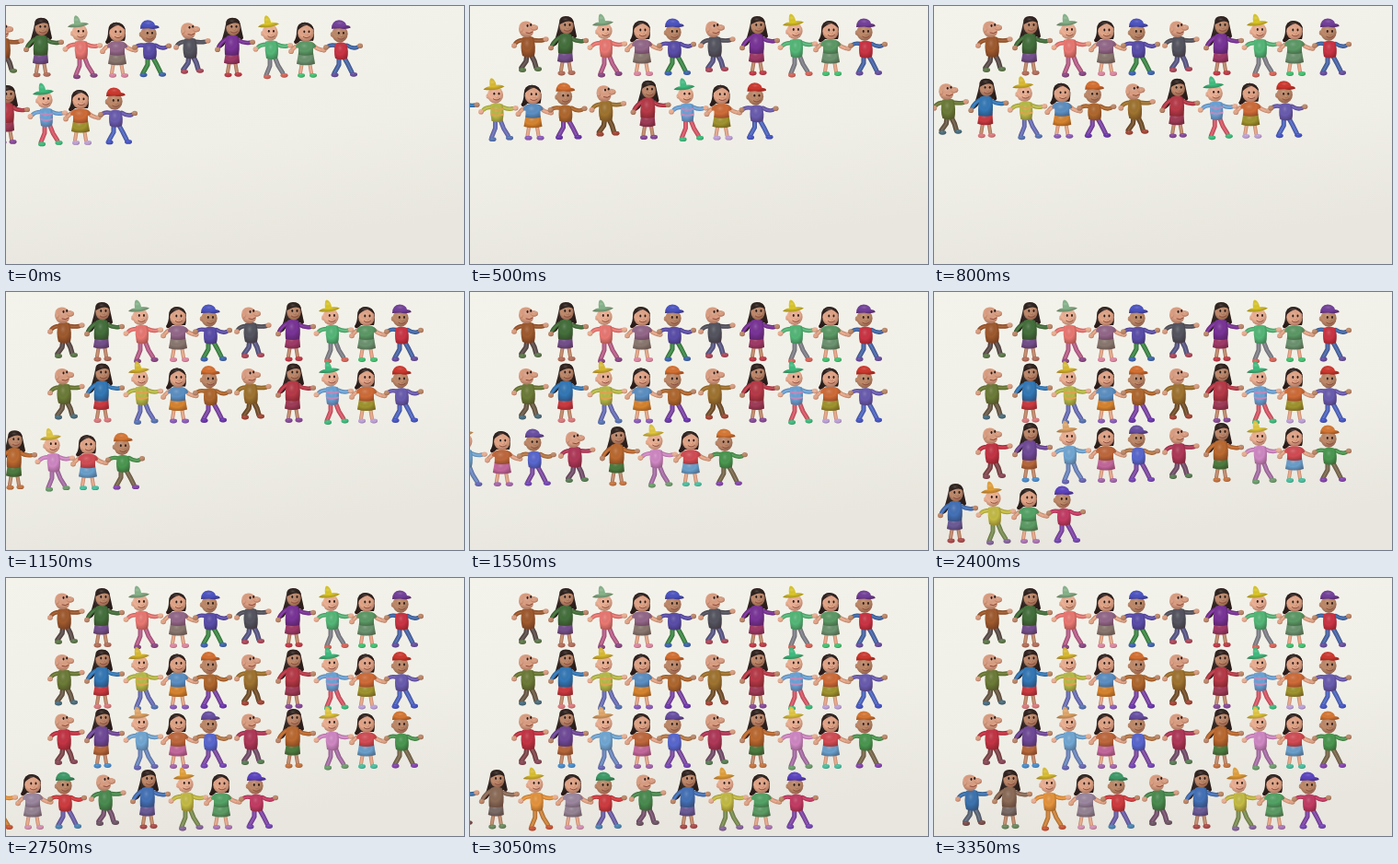
Write an HTML page that moves like this. It is 498 by 280 pixels and loops after 3.4 s.

```html
<!DOCTYPE html>
<html lang="en">
<head>
<meta charset="utf-8">
<title>Clay parade</title>
<style>
  html, body { margin: 0; width: 100%; height: 100%; overflow: hidden; background: #f1f0e8; }
  svg { display: block; position: absolute; left: 0; top: 0; }
</style>
</head>
<body>
<svg width="498" height="280" viewBox="0 0 498 280">
  <defs>
    <linearGradient id="paper" x1="0" y1="0" x2=".25" y2="1">
      <stop offset="0" stop-color="#f4f3eb"/>
      <stop offset=".6" stop-color="#f0efe7"/>
      <stop offset="1" stop-color="#e8e6de"/>
    </linearGradient>
    <radialGradient id="clay" cx=".42" cy=".34" r=".72">
      <stop offset="0" stop-color="#fff" stop-opacity=".18"/>
      <stop offset=".5" stop-color="#000" stop-opacity="0"/>
      <stop offset="1" stop-color="#200" stop-opacity=".32"/>
    </radialGradient>
  </defs>
  <rect width="498" height="280" fill="url(#paper)"/>
  <g id="stage"></g>
</svg>
<script>
const LOOP = 3400, STEP = 50;
const HAIR = '#30231f';
const SKIN = { man: '#dda083', long: '#c08a6c', hat: '#eeb295', girl: '#e4a688', cap: '#bf8a6a' };
const KINDS = ['man', 'long', 'hat', 'girl', 'cap'];
const XS = [64, 103, 147, 187, 222, 267, 311, 354, 392, 430];

// Per figure: shirt, trousers or skirt, shoes, headwear, accent (stripes or sleeves)
const ROWS = [
  { y: 0, tilt: .027, path: [[0, -66], [250, -22], [480, 0]], wear: [
    '#a05a2e #5c4f4c #5f7a4c', '#44703c #74508c #b8705c', '#ea7872 #b8608a #8c4a86 #86b48a',
    '#94688a #8a7870 #e08aa4', '#5a4eaa #3f8a48 #3f68b4 #4c54c4', '#555560 #5a5a88 #b04a5c',
    '#7a3498 #a03a68 #c43c48', '#54b878 #80828a #d8685c #dcc828', '#5c9a66 #6c9470 #48c474',
    '#cc3444 #4a68a8 #6a50a4 #74409c #4068a8'] },
  { y: 66.5, tilt: .027, path: [[0, -311], [500, -118.5], [750, -57], [990, -20], [1150, 0]], wear: [
    '#6c7c38 #6b5b48 #4c7080', '#3479b8 #cc3a40 #e07c80', '#b8bc48 #6a70b8 #5a78b8 #dcbc30 #e0a050',
    '#5c90c4 #d8842e #9060c0', '#b0682e #7c46a6 #6c38b0 #d87030', '#a07430 #74522e #a84838',
    '#b83a48 #a03c58 #8a4c9c', '#6ca4d8 #d85868 #40c080 #40be80 #c088b8', '#d06c38 #a0942e #c2a4dc',
    '#6a5cb0 #5068c0 #4858c8 #d0382e'] },
  { y: 131, tilt: .027, path: [[790, -460], [1150, -303], [1540, -156], [1650, -115], [1900, -57], [2150, -20], [2350, 0]], wear: [
    '#c43444 #80484c #8a4a58', '#704a98 #b8683a #4c90d0', '#72a8d4 #6c88c0 #6a68b8 #e2a768',
    '#c0683c #c4689c #a868b0', '#5868d0 #7e4ca4 #7848b8 #6a50a4 #b87844', '#b03858 #74506c #5c8058',
    '#bc6a30 #4c7c40 #c87844', '#d088c4 #a870a8 #70a070 #e2c840', '#d44c54 #6aa0cc #48c4a4',
    '#4a9850 #7a6a50 #8848b0 #d87834'] },
  { y: 197, tilt: 0, path: [[1980, -460], [2400, -289], [2750, -158], [3000, -86], [3350, -22]], wear: [
    '#3c74b0 #5c6878 #7c504c', '#8c6c58 #7c6c68 #6c8c60', '#e6943c #cc843c #cc5838 #dcc030',
    '#9c88a0 #968494 #d894b4', '#d03c40 #6c60a8 #4c88b8 #3c9c68', '#4a8c50 #785470 #705868',
    '#4472b8 #6c5c98 #b04c4c', '#c4bc44 #7c9054 #8868a0 #e4a038', '#54a466 #5c9c64 #b078b8',
    '#c43c64 #8048a8 #7848b8 #5c44c4'] }
];

const clay = (tag, fill) => `<${tag} fill="${fill}"/><${tag} fill="url(#clay)"/>`;
const blob = (d, fill) => clay(`path d="${d}"`, fill);
const ball = (x, y, rx, ry, fill) => clay(`ellipse cx="${x}" cy="${y}" rx="${rx}" ry="${ry}"`, fill);
const line = (d, color, w, extra = '') =>
  `<path d="${d}" fill="none" stroke="${color}" stroke-width="${w}" stroke-linecap="round" stroke-linejoin="round" ${extra}/>`;
const limb = (d, color, w) => line(d, color, w) +
  line(d, '#200', w, 'opacity=".17"') + line(d, color, w * .62) + line(d, '#fff', w * .2, 'opacity=".14"');
const eye = (x, y) => `<ellipse cx="${x}" cy="${y}" rx="1" ry="1.4" fill="#2a1c18"/>`;

function face(x, y, skin) {
  return eye(x - 2.2, y - 2) + eye(x + 3, y - 2) + ball(x + .7, y + .8, 1.8, 1.6, skin) +
    line(`M${x - 3.2} ${y + 3.6}q3.6 2.8 7.2-.2`, '#8a4638', .9);
}

const arms = (left, right, color, skin, lh, rh) =>
  limb(left, color, 4.4) + limb(right, color, 4.4) + ball(...lh, 2.9, 2.8, skin) + ball(...rh, 3, 2.7, skin);
const shoes = (a, b, color) => ball(a[0], a[1], 4, 2.4, color) + ball(b[0], b[1], 4, 2.4, color);

const draw = {
  man(skin, shirt, low, shoe) {
    return limb('M-2 52L-3 60L-8 67', low, 5.4) + limb('M2 52L6 60L8 67', low, 5.4) +
      shoes([-7, 69.5], [10, 68.5], shoe) +
      arms('M-6 37Q-12 37-15 41', 'M5 37Q11 38 16 37', shirt, skin, [-16, 43], [18.5, 36]) +
      blob('M-7 34Q-1 31 5 34Q8 44 6 54Q-1 57-7 54Q-10 44-7 34Z', shirt) +
      blob('M-11 25Q-11 17-4 16.5Q1 16 4 20Q9 20 9 23.5Q9 26.5 5 27Q5 33-2 34Q-10 34-11 25Z', skin) +
      ball(-8.5, 26, 2, 2.6, skin) + ball(6, 23.5, 4, 3, skin) +
      eye(-1.5, 21.5) + eye(2.2, 20.5) + line('M-3 29q4 1.8 7-.8', '#8a4638', 1);
  },
  long(skin, shirt, low, shoe) {
    return blob('M-6 18Q-6 11 1 11Q9 11 10 19L13 33Q11 37 9 33L-4 34Q-8 44-14 44Q-9 34-6 18Z', HAIR) +
      limb('M-2 58L-4 70', skin, 4) + limb('M4 58L6 70', skin, 4) + shoes([-3.5, 73], [7.5, 72.5], shoe) +
      arms('M-5 34Q-11 37-14 43', 'M7 35Q13 39 20 38', shirt, skin, [-15, 45.5], [23, 37.5]) +
      blob('M-6 47L8 47L9 60Q1 63-8 60Z', low) +
      blob('M-5 31Q1 28.5 7 31Q10 40 8 51Q1 53-7 51Q-8 40-5 31Z', shirt) +
      ball(2, 22, 7.6, 8.4, skin) + blob('M-5.5 20Q-4 11 3 11.5Q9 12 9.5 18Q4 14-5.5 20Z', HAIR) + face(2.5, 22.5, skin);
  },
  hat(skin, shirt, low, shoe, hat, stripe) {
    const bands = stripe ? [42, 48].map(y => line(`M-5 ${y}Q1 ${y + 2} 7 ${y}`, stripe, 2)).join('') : '';
    return limb('M-1 53L-1 63L-5 73', low, 4.8) + limb('M4 53L8 63L13 71', low, 4.8) +
      shoes([-4, 75], [14.5, 73.5], shoe) +
      arms('M-5 40Q-11 40-14 43', 'M7 40Q13 43 18 41.5', shirt, skin, [-16.5, 45], [21, 41]) +
      blob('M-6 37Q1 34 7 37Q9 46 7 55Q1 57.5-5 55Q-7 46-6 37Z', shirt) + bands +
      ball(-9, 28, 2, 2.7, skin) + ball(-1, 27, 8.6, 9, skin) + face(0, 27.5, skin) +
      blob('M-14 21Q-11 17.5-7 17.5Q-8 8.5-5 8.5Q-1 10 0 16Q6 15.5 9 17.5Q1 23-14 21Z', hat);
  },
  girl(skin, shirt, low, shoe) {
    return blob('M-10 26Q-10 16-1 16Q8 16 9 26Q9 33 8 36L4 36L-6 36Q-12 42-13 37Q-10 33-10 26Z', HAIR) +
      limb('M-4 59L-6 71', skin, 4) + limb('M4 59L6 71', skin, 4) + shoes([-5, 73.5], [8, 73.5], shoe) +
      arms('M-7 40Q-12 42-15 46', 'M7 40Q12 45 17 46', skin, skin, [-16, 47.5], [19.5, 46]) +
      blob('M-8 49L8 49L10 61Q0 64-10 61Z', low) +
      blob('M-6 37Q0 35 6 37Q11 39 11 43L8 44L8 51Q0 53-8 51L-8 44L-11 43Q-11 39-6 37Z', shirt) +
      ball(0, 27.5, 8.8, 9.2, skin) + blob('M-9.2 25Q-8 16-1 16Q7 17 8.8 24Q4 20 1 19Q-4 20-9.2 25Z', HAIR) + face(.5, 28, skin);
  },
  cap(skin, shirt, low, shoe, hat, sleeve = shirt) {
    return limb('M-2 53L-2 62L-7 71', low, 5) + limb('M3 53L8 62L12 70', low, 5) +
      shoes([-6.5, 73], [14, 72.5], shoe) +
      arms('M-6 41Q-11 40-14 42', 'M7 41Q13 45 18 43', sleeve, skin, [-16, 43], [21, 41.5]) +
      blob('M-6 39Q0 36 6 39Q9 47 7 55Q0 58-6 55Q-8 47-6 39Z', shirt) +
      ball(-9, 29, 2.2, 2.8, skin) + ball(-1, 28.5, 8.6, 9.2, skin) + face(0, 29.5, skin) +
      blob('M-10 23Q-10 14-2 13.5Q5 14 6 19Q11 19.5 10.5 22Q5 24-1 22.5Z', hat);
  }
};

const stage = document.getElementById('stage');
stage.innerHTML = ROWS.map(row => '<g>' + row.wear.map((wear, i) => {
  const kind = KINDS[i % 5];
  return `<g transform="translate(${XS[i]})">${draw[kind](SKIN[kind], ...wear.split(' '))}</g>`;
}).join('') + '</g>').join('');

// Smooth curve through [time, offset] points, level at a final offset of 0
function along(p, t) {
  const last = p.length - 1;
  if (t <= p[0][0]) return p[0][1];
  if (t >= p[last][0]) return p[last][1];
  const rate = k => {
    if (k === last && p[k][1] === 0) return 0;
    const a = p[Math.max(k - 1, 0)], b = p[Math.min(k + 1, last)];
    return (b[1] - a[1]) / (b[0] - a[0]);
  };
  const i = p.findIndex(q => q[0] > t) - 1;
  const [t0, v0] = p[i], [t1, v1] = p[i + 1];
  const h = t1 - t0, u = (t - t0) / h, w = 1 - u;
  return v0 * (1 + 2 * u) * w * w + v1 * u * u * (3 - 2 * u) +
    h * u * w * (rate(i) * w - rate(i + 1) * u);
}

function show(time) {
  const t = Math.floor((time % LOOP) / STEP) * STEP;
  ROWS.forEach((row, i) => {
    const x = along(row.path, t);
    stage.children[i].setAttribute('transform', `translate(${x.toFixed(2)} ${(row.y - x * row.tilt).toFixed(2)})`);
  });
}

const start = performance.now();
function tick() {
  show(performance.now() - start);
  requestAnimationFrame(tick);
}
tick();
</script>
</body>
</html>
```
